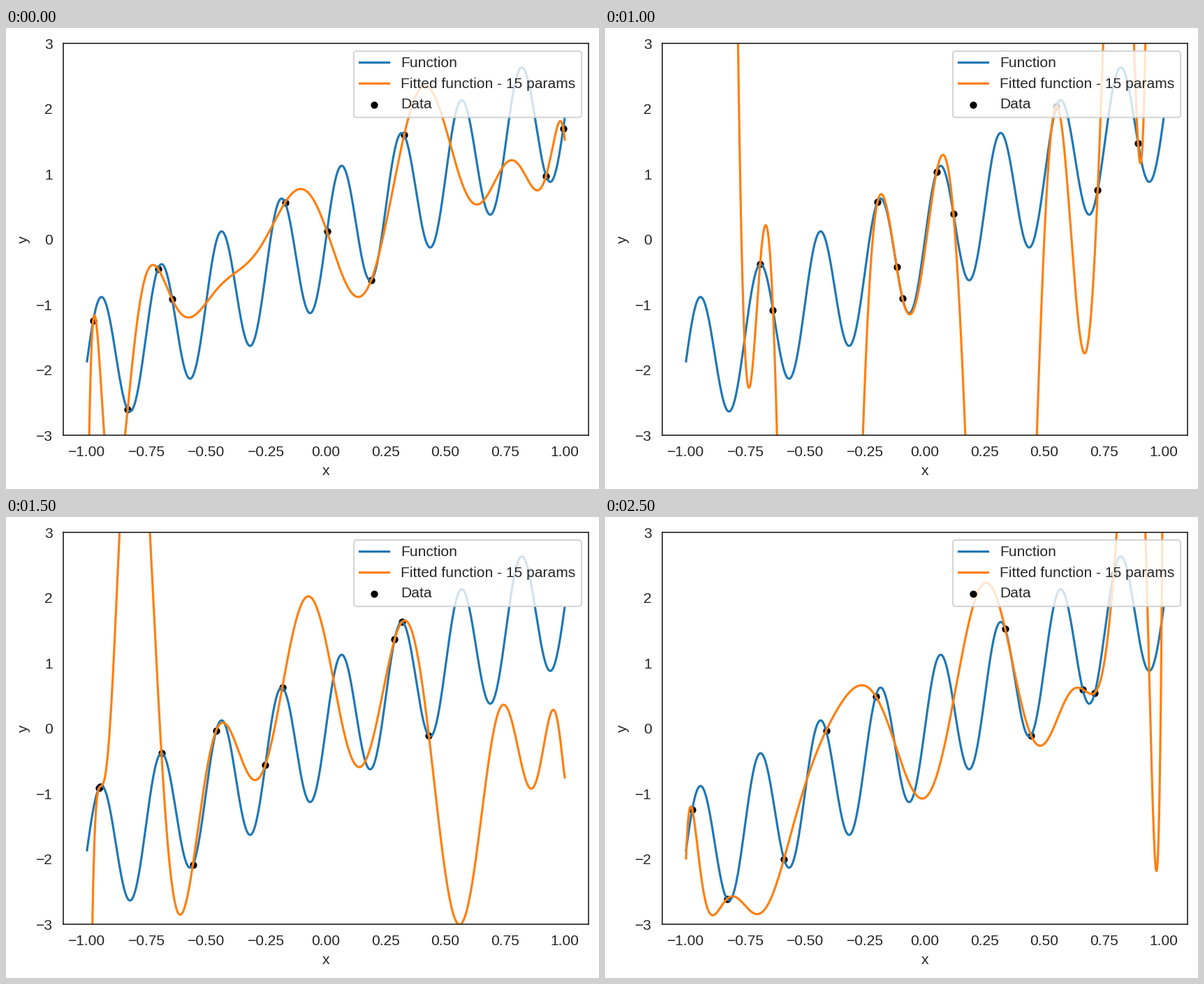
Recreate the animation shown at these times as a matplotlib script. Size 849 by 660 pixels, loop 3 s.

```python
import matplotlib.pyplot as plt
import numpy as np
from matplotlib.animation import FuncAnimation
from numpy.polynomial.legendre import legvander

W, H, DPI = 849, 660, 151.6
PARAMS = 15
INK = "0.15"

# x of the ten sampled points, one row per fit
SAMPLES = np.array([
    [-.974, -.830, -.703, -.6436, -.171, .0045, .190, .3275, .9217, .9937],
    [-.9266, -.8685, -.8657, -.6186, -.5898, -.580, -.0555, .1297, .500, .795],
    [-.690, -.636, -.1986, -.1184, -.0935, .0487, .1194, .551, .7235, .8922],
    [-.9495, -.9445, -.6885, -.557, -.459, -.2535, -.1827, .2878, .3186, .4312],
    [-.9605, -.801, -.792, -.643, -.538, -.5237, -.5138, .3055, .3435, .5995],
    [-.974, -.8285, -.5898, -.4136, -.206, .3362, .4443, .6606, .7113, .790],
])


def wave(x):
    return 2 * x + np.sin(25 * x)


def features(x):
    """Legendre polynomials of degree 1 to PARAMS, without a constant."""
    return legvander(x, PARAMS)[:, 1:]


def fit(xs, grid):
    """Smallest-norm series through the samples, evaluated on the grid."""
    coef = np.linalg.lstsq(features(xs), wave(xs), rcond=None)[0]
    return features(grid) @ coef


plt.rcParams.update({
    "font.family": "Liberation Sans", "font.size": 10,
    "axes.edgecolor": INK, "axes.labelcolor": INK, "text.color": INK,
    "xtick.color": INK, "ytick.color": INK,
    "xtick.bottom": False, "ytick.left": False,
})

grid = np.linspace(-1, 1, 1000)
curves = [fit(xs, grid) for xs in SAMPLES]

fig = plt.figure(figsize=((W + .001) / DPI, (H + .001) / DPI), dpi=DPI)
ax = fig.add_axes([81.8 / W, 77 / H, 752.4 / W, 560.6 / H])
ax.plot(grid, wave(grid), color="#1f77b4", label="Function")
fitted, = ax.plot(grid, curves[0], color="#ff7f0e",
                  label=f"Fitted function - {PARAMS} params")
dots = ax.scatter(SAMPLES[0], wave(SAMPLES[0]), s=15, color="black", label="Data")
ax.set(xlim=(-1.1, 1.1), ylim=(-3, 3), xlabel="x", ylabel="y")
ax.legend(loc="upper right")


def update(i):
    xs = SAMPLES[i]
    fitted.set_ydata(curves[i])
    dots.set_offsets(np.column_stack([xs, wave(xs)]))
    return fitted, dots


anim = FuncAnimation(fig, update, frames=len(curves), interval=500,
                     repeat=True, repeat_delay=0)
plt.show()
```
